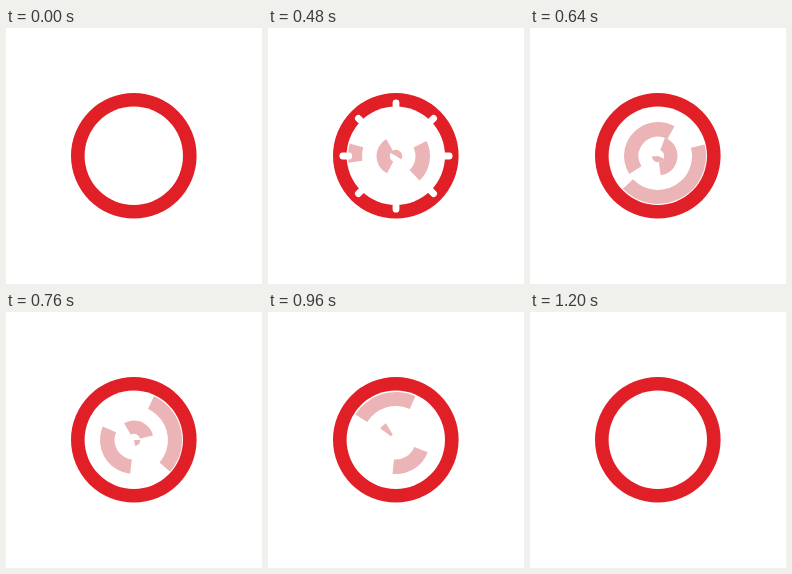
These frames come from a looping animation (256x256 px, 1.28 s). An HTML page with a canvas:

```html
<!DOCTYPE html>
<html>
<head>
<meta charset="utf-8">
<style>
  html, body { margin: 0; width: 100%; height: 100%; overflow: hidden; background: #fff; }
  canvas { display: block; }
</style>
</head>
<body>
<canvas id="stage" width="256" height="256"></canvas>
<script>
const ctx = document.getElementById('stage').getContext('2d');
const LOOP = 1280, STEP = 40;
const RED = '#e01f26', PINK = '#ebb4b6';
const rad = deg => deg * Math.PI / 180;

// A sweep window [head, tail] in degrees travels counterclockwise along all bands.
const HEAD = [[360, 707], [480, 532], [640, 346], [880, 257], [1040, 165], [1190, 100]];
const TAIL = [[360, 900], [480, 720], [640, 497], [880, 329], [1040, 262], [1190, 172]];

// Each band shows the part of the window inside lo..hi, turned by its own offset.
const BANDS = [
  { r0: 0, r1: 6.2, lo: 322, hi: 715, turn: 322 },
  { r0: 6.2, r1: 19.5, lo: 271, hi: 655, turn: 415 },
  { r0: 19.5, r1: 34, lo: 219, hi: 604, turn: 198 },
  { r0: 34, r1: 48, lo: 172, hi: 555, turn: 0 }
];

// Smooth curve through [time, value] keys.
function curve(keys, t) {
  const last = keys.length - 1;
  if (t <= keys[0][0]) return keys[0][1];
  if (t >= keys[last][0]) return keys[last][1];
  const i = keys.findIndex(k => k[0] > t) - 1;
  const slope = n => {
    const a = keys[Math.max(n - 1, 0)], b = keys[Math.min(n + 1, last)];
    return (b[1] - a[1]) / (b[0] - a[0]);
  };
  const [t0, v0] = keys[i], [t1, v1] = keys[i + 1];
  const d = t1 - t0, u = (t - t0) / d, w = 1 - u;
  return w * w * (1 + 2 * u) * v0 + u * u * (3 - 2 * u) * v1
    + d * u * w * (w * slope(i) - u * slope(i + 1));
}

function drawBand({ r0, r1, lo, hi, turn }, head, tail) {
  const from = Math.max(lo, head), to = Math.min(hi, tail);
  if (to <= from) return;
  const a = rad(from - turn), b = rad(to - turn);
  ctx.beginPath();
  ctx.arc(0, 0, r1, a, b);
  ctx.arc(0, 0, r0, b, a, true);
  ctx.fill();
}

function disc(r, color) {
  ctx.fillStyle = color;
  ctx.beginPath();
  ctx.arc(-0.2, -0.2, r, 0, 2 * Math.PI);
  ctx.fill();
}

// Eight white dashes fly outward across the ring.
function drawRays(t) {
  if (t < 440 || t > 620) return;
  const r = 50.2 + (t - 480) * 0.13;
  ctx.strokeStyle = '#fff';
  ctx.lineWidth = 6.8;
  ctx.lineCap = 'round';
  ctx.beginPath();
  for (let i = 0; i < 8; i++) {
    const x = Math.cos(rad(i * 45)), y = Math.sin(rad(i * 45));
    ctx.moveTo(x * (r - 3), y * (r - 3));
    ctx.lineTo(x * (r + 3), y * (r + 3));
  }
  ctx.stroke();
}

function draw(t) {
  ctx.setTransform(1, 0, 0, 1, 0, 0);
  ctx.fillStyle = '#fff';
  ctx.fillRect(0, 0, 256, 256);
  ctx.translate(128, 128);

  disc(62.8, RED);
  disc(49.2, '#fff');

  if (t >= 360 && t < 1200) {
    ctx.fillStyle = PINK;
    const head = curve(HEAD, t), tail = curve(TAIL, t);
    BANDS.forEach(band => drawBand(band, head, tail));
    drawRays(t);
  }
}

const start = performance.now();
function tick() {
  const t = (performance.now() - start) % LOOP;
  draw(Math.floor(t / STEP) * STEP);
  requestAnimationFrame(tick);
}
tick();
</script>
</body>
</html>
```
